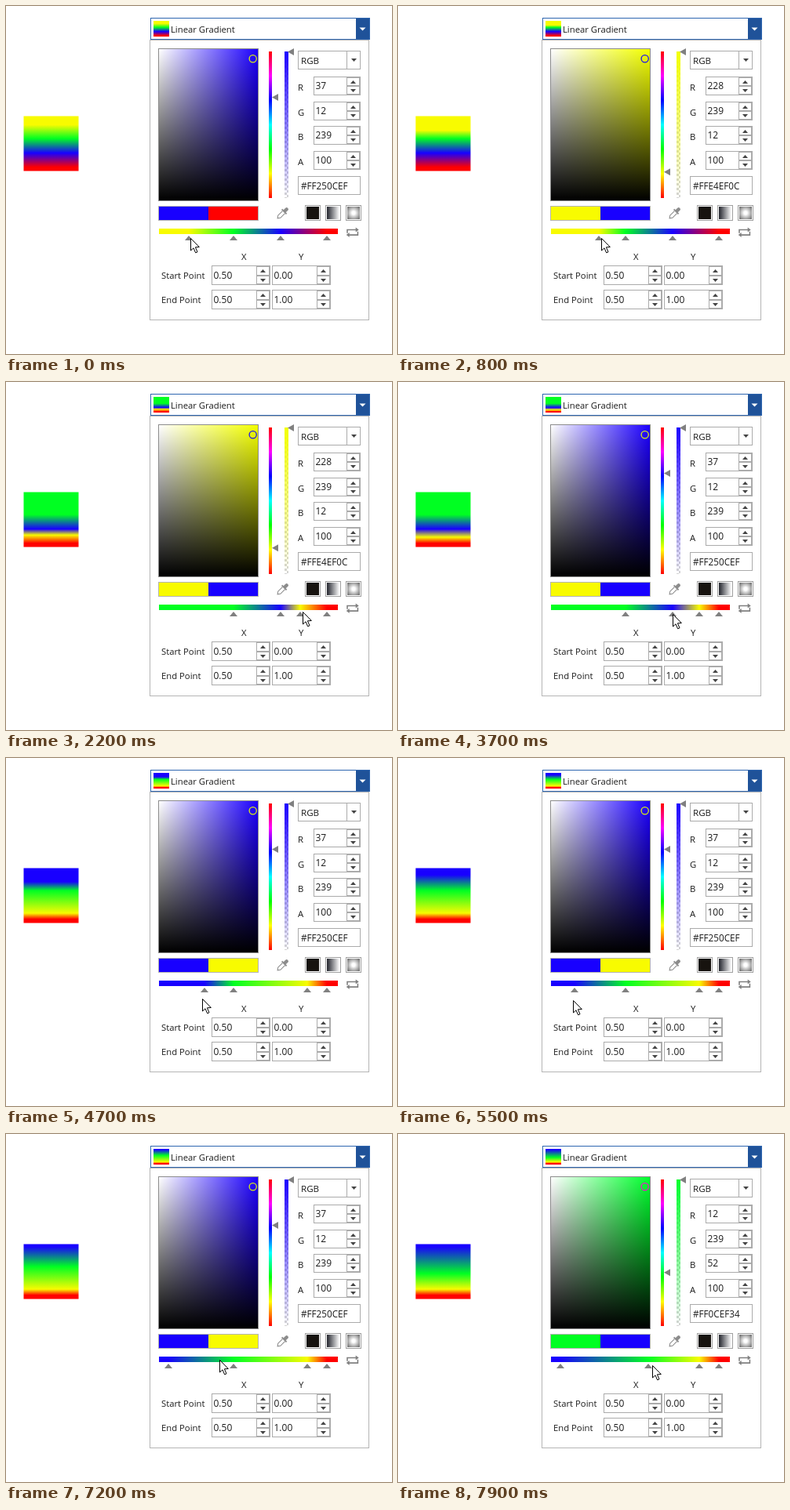
An HTML page with a canvas for the animation above (8000 ms loop, 492x444 px).

```html
<!DOCTYPE html>
<html lang="en">
<head>
<meta charset="utf-8">
<title>Gradient editor</title>
<style>
html, body { margin: 0; width: 100%; height: 100%; overflow: hidden; background: #fff; }
canvas { display: block; }
</style>
</head>
<body>
<canvas id="stage" width="492" height="444"></canvas>
<script>
const ctx = document.getElementById('stage').getContext('2d');
const LOOP = 8000, STEP = 100;
const GRAY = '#808080', LINE = '#ababab', INK = '#1c1c1c';
const BAR = { x: 195, y: 284, w: 228, h: 7 };

const COLORS = {
  yellow: { rgb: [228, 239, 12], hue: 62.9, paint: '#f8fb00' },
  green: { rgb: [12, 239, 52], hue: 130.6, paint: '#00ff22' },
  blue: { rgb: [37, 12, 239], hue: 246.6, paint: '#1800ff' },
  red: { paint: '#ff0000' }
};

// Pointer moves; a drag also takes the named stop to its own end point.
const START = { x: 235, y: 296, yellow: 233, green: 290, blue: 350, red: 409 };
const MOVES = [
  { from: 600, to: 2500, goal: { x: 388, y: 293, yellow: 384 } },
  { from: 2700, to: 2900, goal: { x: 337, y: 288 } },
  { from: 3000, to: 3300, goal: { x: 350, y: 296 } },
  { from: 3800, to: 4700, goal: { x: 250, y: 307, blue: 253 } },
  { from: 4700, to: 6400, goal: { x: 206, y: 310, blue: 207 } },
  { from: 6500, to: 7000, goal: { x: 285, y: 296 } },
  { from: 7100, to: 7200, goal: { x: 272, y: 288 } },
  { from: 7300, to: 7400, goal: { x: 288, y: 295 } },
  { from: 7600, to: 7900, goal: { x: 324, y: 295, green: 319 } }
];
const SELECTED = [[0, 'blue'], [100, 'yellow'], [3700, 'blue'], [7700, 'green']];
const SWATCHES = [[0, 'blue', 'red'], [700, 'yellow', 'blue'],
                  [3900, 'blue', 'yellow'], [7800, 'green', 'blue']];

const easeOut = p => 1 - (1 - p) ** 1.5;
const hold = (keys, t) => keys.filter(k => k[0] <= t).pop().slice(1);

function pose(t) {
  const now = { ...START };
  for (const { from, to, goal } of MOVES) {
    if (t <= from) break;
    const p = easeOut(Math.min(1, (t - from) / (to - from)));
    for (const key in goal) now[key] = Math.round(now[key] + (goal[key] - now[key]) * p);
  }
  return now;
}

function rect(x, y, w, h, fill) {
  ctx.fillStyle = fill;
  ctx.fillRect(x, y, w, h);
}

function frame(x, y, w, h, color = LINE) {
  ctx.strokeStyle = color;
  ctx.lineWidth = 1;
  ctx.strokeRect(x + 0.5, y + 0.5, w - 1, h - 1);
}

function text(str, x, y, size = 11.3) {
  ctx.font = `${size}px "Open Sans", "Noto Sans", sans-serif`;
  ctx.fillStyle = INK;
  ctx.fillText(str, x, y);
}

function path(points, x = 0, y = 0) {
  ctx.beginPath();
  points.forEach(([px, py]) => ctx.lineTo(x + px, y + py));
}

function shape(points, fill, x, y) {
  path(points, x, y);
  ctx.closePath();
  ctx.fillStyle = fill;
  ctx.fill();
}

function line(points, color, width) {
  path(points);
  ctx.strokeStyle = color;
  ctx.lineWidth = width;
  ctx.stroke();
}

const up = (x, y, r, h, c) => shape([[0, 0], [r, h], [-r, h]], c, x, y);
const down = (x, y, r, h, c) => shape([[-r, 0], [r, 0], [0, h]], c, x, y);
const left = (x, y) => shape([[0, 0], [8, -4.5], [8, 4.5]], GRAY, x, y);

function linear(x0, y0, x1, y1, stops) {
  const g = ctx.createLinearGradient(x0, y0, x1, y1);
  stops.forEach(([at, color]) => g.addColorStop(at, color));
  return g;
}

function spinner(x, y, w, h, value) {
  frame(x, y, w, h);
  text(value, x + 2.5, y + h - 8, 12);
  const bx = x + w - 18, mid = bx + 8.5, half = h - 13;
  frame(bx, y + 1, 17, half);
  frame(bx, y + half + 1, 17, 11);
  up(mid, y + 5, 3.5, 4, '#444');
  down(mid, y + h - 8, 3.5, 4, '#444');
}

function header(fill) {
  frame(183, 43, 280, 358, '#b5b5b5');
  rect(184, 15, 280, 28, '#fff');
  rect(446, 15, 18, 28, '#1f5299');
  frame(184, 15, 280, 28, '#2f66b0');
  down(454.5, 27.5, 4, 4, '#fff');
  rect(188, 19, 20, 20, fill);
  text('Linear Gradient', 210, 34);
}

function picker(color) {
  const pure = `hsl(${color.hue}, 100%, 50%)`;
  const clear = `hsla(${color.hue}, 100%, 50%, 0)`;
  frame(194, 54, 128, 195, '#8c8c8c');
  rect(195, 55, 126, 193, linear(195, 0, 321, 0, [[0, '#fff'], [1, pure]]));
  rect(195, 55, 126, 193, linear(0, 55, 0, 248, [[0, 'rgba(0,0,0,0)'], [1, '#000']]));
  ctx.beginPath();
  ctx.arc(314.7, 67.3, 4.6, 0, Math.PI * 2);
  ctx.strokeStyle = `rgb(${color.rgb.map(v => 255 - v)})`;
  ctx.lineWidth = 1.3;
  ctx.stroke();

  const wheel = [...Array(7).keys()].map(i => [i / 6, `hsl(${360 - i * 60}, 100%, 50%)`]);
  rect(335, 58, 4, 187, linear(0, 58, 0, 245, wheel));
  left(339, 57.5 + 187 * (1 - color.hue / 360));

  for (let y = 58; y < 245; y += 3)
    for (let i = 0; i < 2; i++)
      rect(355 + i * 3, y, 3 - i, Math.min(3, 245 - y), (y - 58) / 3 % 2 === i ? '#d4d4d4' : '#fff');
  rect(355, 58, 5, 187, linear(0, 58, 0, 245, [[0, pure], [1, clear]]));
  left(359, 58.5);
}

function fields(rgb) {
  frame(372, 57, 80, 24);
  frame(434, 57, 18, 24);
  down(443.5, 67, 3.5, 4, '#444');
  text('RGB', 376, 74, 11.6);
  [...rgb, 100].forEach((value, i) => {
    const y = Math.round(90 + i * 31.7);
    text('RGBA'[i], 372, y + 18);
    spinner(392, y, 60, 24, String(value));
  });
  const hex = rgb.map(v => v.toString(16).padStart(2, '0')).join('').toUpperCase();
  frame(372, 217, 80, 24);
  text('#FF' + hex, 376, 234, 11.7);
}

function eyedropper() {
  const tone = '#8c8c8c';
  ctx.save();
  ctx.translate(352.5, 264.5);
  ctx.rotate(Math.PI / 4);
  ctx.fillStyle = tone;
  ctx.beginPath();
  ctx.roundRect(-2.2, -9.5, 4.4, 7, 2);
  ctx.fill();
  rect(-4.2, -4, 8.4, 2, tone);
  line([[-2.2, -2], [-2.2, 6], [0, 9], [2.2, 6], [2.2, -2]], tone, 1.1);
  ctx.restore();
}

function modes() {
  const radial = ctx.createRadialGradient(443, 264, 2, 443, 264, 10);
  radial.addColorStop(0, '#fff');
  radial.addColorStop(1, '#777');
  const fills = ['#17130f', linear(409, 0, 425, 0, [[0, '#22242c'], [1, '#fff']]), radial];
  fills.forEach((fill, i) => {
    const x = 381 + i * 26;
    frame(x, 254, 20, 20, '#a0a0a0');
    rect(x + 2, 256, 16, 16, fill);
  });
}

// One arrow, repeated after a half turn.
function swapIcon() {
  ctx.save();
  ctx.translate(441.7, 288.8);
  for (let i = 0; i < 2; i++) {
    line([[-6.7, 1], [-6.7, -3.3], [5, -3.3]], GRAY, 1.6);
    shape([[4, -6.3], [8, -3.3], [4, -0.3]], GRAY);
    ctx.rotate(Math.PI);
  }
  ctx.restore();
}

function points() {
  text('X', 300, 324);
  text('Y', 373, 324);
  [['Start Point', '0.00'], ['End Point', '1.00']].forEach(([label, value], i) => {
    const y = 331 + i * 31;
    text(label, 198, y + 17);
    spinner(262, y, 75, 25, '0.50');
    spinner(339, y, 75, 25, value);
  });
}

function pointer(x, y) {
  shape([[0.5, 0.5], [0.5, 16], [4, 12.8], [6.6, 18.8], [9, 17.8], [6.4, 11.8], [11.3, 11.5]], '#fff', x, y);
  ctx.strokeStyle = '#000';
  ctx.lineWidth = 1;
  ctx.stroke();
}

function draw(t) {
  rect(0, 0, 492, 444, '#fff');
  const now = pose(t);
  const color = COLORS[hold(SELECTED, t)[0]];
  const stops = Object.keys(COLORS)
    .map(name => [(now[name] - BAR.x) / BAR.w, COLORS[name].paint])
    .sort((a, b) => a[0] - b[0]);

  rect(22.5, 140.5, 70, 70, linear(0, 140, 0, 210, stops));
  header(linear(0, 19, 0, 39, stops));
  picker(color);
  fields(color.rgb);

  hold(SWATCHES, t).forEach((name, i) => rect(195 + i * 63, 256, 63, 17, COLORS[name].paint));
  frame(194, 255, 128, 19, '#b4b4b4');
  eyedropper();
  modes();

  rect(BAR.x, BAR.y, BAR.w, BAR.h, linear(BAR.x, 0, BAR.x + BAR.w, 0, stops));
  Object.keys(COLORS).forEach(name => up(now[name], 293, 5, 6, GRAY));
  swapIcon();
  points();
  pointer(now.x, now.y);
}

const start = performance.now();
function tick() {
  const t = (performance.now() - start) % LOOP;
  draw(Math.floor(t / STEP) * STEP);
  requestAnimationFrame(tick);
}
tick();
</script>
</body>
</html>
```
